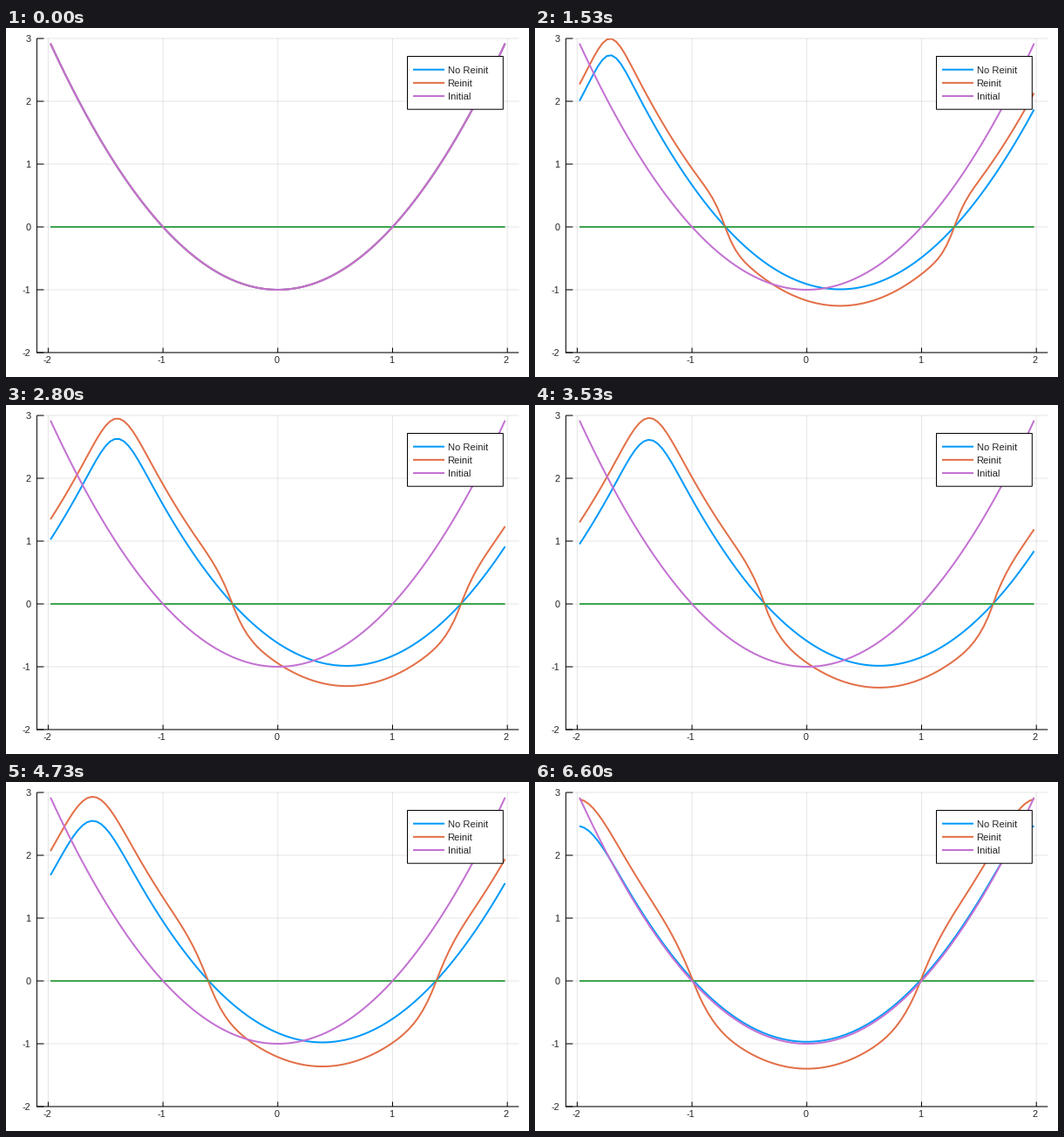
Write a matplotlib script that moves like this. It is 600x400 px and loops after 6.67 s.

```python
import numpy as np
import matplotlib.pyplot as plt
from matplotlib.animation import FuncAnimation
from matplotlib.patches import Rectangle

W, H, DPI = 600, 400, 100
PX = 72 / DPI  # one pixel in points
STEPS, LOOP_MS = 100, 6670
TICKS = 3  # animation ticks per simulation step
CELLS, LENGTH = 100, 4.0
DX, DT = LENGTH / CELLS, 1 / STEPS

BLUE, ORANGE, GREEN, PURPLE = "#009AFA", "#E36F47", "#3EA44E", "#C371D2"
INK = "#262626"

plt.rcParams["font.family"] = "Liberation Sans"
plt.rcParams["font.size"] = 11 * PX
plt.rcParams["path.snap"] = False

x = -LENGTH / 2 + DX * (np.arange(CELLS) + 0.5)
start = x**2 - 1


def advect(u, c):
    """One periodic first-order upwind step with Courant number c."""
    if c > 0:
        return u - c * (u - np.roll(u, 1))
    return u - c * (np.roll(u, -1) - u)


def simulate():
    plain, reinit = [start], [start]
    for n in range(1, STEPS):
        c = 2 * np.sin(2 * np.pi * n * DT) * DT / DX
        plain.append(advect(plain[-1], c))
        w = advect(reinit[-1], c)
        gain = 0.0926 * (np.cbrt(n) - np.cbrt(n - 1))
        reinit.append(w + gain * np.tanh(w / 0.08))
    return plain, reinit


plain, reinit = simulate()

fig = plt.figure(figsize=(W / DPI, H / DPI), dpi=DPI, facecolor="white")

# Overlay in pixel coordinates, y down
page = fig.add_axes([0, 0, 1, 1], zorder=2)
page.set(xlim=(0, W), ylim=(H, 0))
page.axis("off")

LEFT, RIGHT, TOP, BOTTOM = 35.4, 588.2, 12, 372
ax = fig.add_axes([LEFT / W, 1 - BOTTOM / H,
                   (RIGHT - LEFT) / W, (BOTTOM - TOP) / H], zorder=1)
half = 1.98 * 1.06
ax.set(xlim=(-half, half), ylim=(-2, 3))
ax.axis("off")


def px_x(v):
    return LEFT + (v + half) / (2 * half) * (RIGHT - LEFT)


def px_y(v):
    return BOTTOM - (v + 2) * 72


def stroke(xs, ys, color="black", width=1.0, **kw):
    page.plot(xs, ys, color=color, lw=width * PX, solid_capstyle="butt", **kw)


def label(px, py, text, ha):
    page.text(px, py, text, ha=ha, va="center_baseline", color=INK)


def data_line(y, color):
    return ax.plot(x, y, color=color, lw=2 * PX, zorder=3,
                   solid_capstyle="butt", solid_joinstyle="round")[0]


for v in range(-2, 3):
    ax.axvline(v, color="black", alpha=0.1, lw=PX, zorder=1)
    stroke([px_x(v)] * 2, [BOTTOM, BOTTOM - 5.5])
    label(px_x(v) - 1.4, 380.5, str(v), "center")
for v in range(-2, 4):
    ax.axhline(v, color="black", alpha=0.1, lw=PX, zorder=1, clip_on=False)
    stroke([LEFT, LEFT + 8], [px_y(v)] * 2)
    label(28.5, px_y(v), str(v), "right")
stroke([LEFT, LEFT], [TOP, BOTTOM + 0.5])
stroke([LEFT, RIGHT], [BOTTOM, BOTTOM])

plain_line = data_line(start, BLUE)
reinit_line = data_line(start, ORANGE)
data_line(0 * x, GREEN)
data_line(start, PURPLE)

page.add_patch(Rectangle((460.5, 32.5), 109.8, 60.7, fc="white", ec="black",
                         lw=PX, zorder=4))
entries = [("No Reinit", BLUE), ("Reinit", ORANGE), ("Initial", PURPLE)]
for i, (name, color) in enumerate(entries):
    y = 47.7 + 15.15 * i
    stroke([467, 503], [y, y], color, 2, zorder=5)
    page.text(506.6, y + 0.4, name, size=11.2 * PX, va="center_baseline",
              color=INK, zorder=5)


def update(tick):
    # Each step begins on the last tick of its predecessor's slot
    n = (tick + 1) // TICKS % STEPS
    plain_line.set_ydata(plain[n])
    reinit_line.set_ydata(reinit[n])
    return plain_line, reinit_line


anim = FuncAnimation(fig, update, frames=STEPS * TICKS,
                     interval=LOOP_MS / (STEPS * TICKS),
                     repeat=True, repeat_delay=0, blit=False)
plt.show()
```
